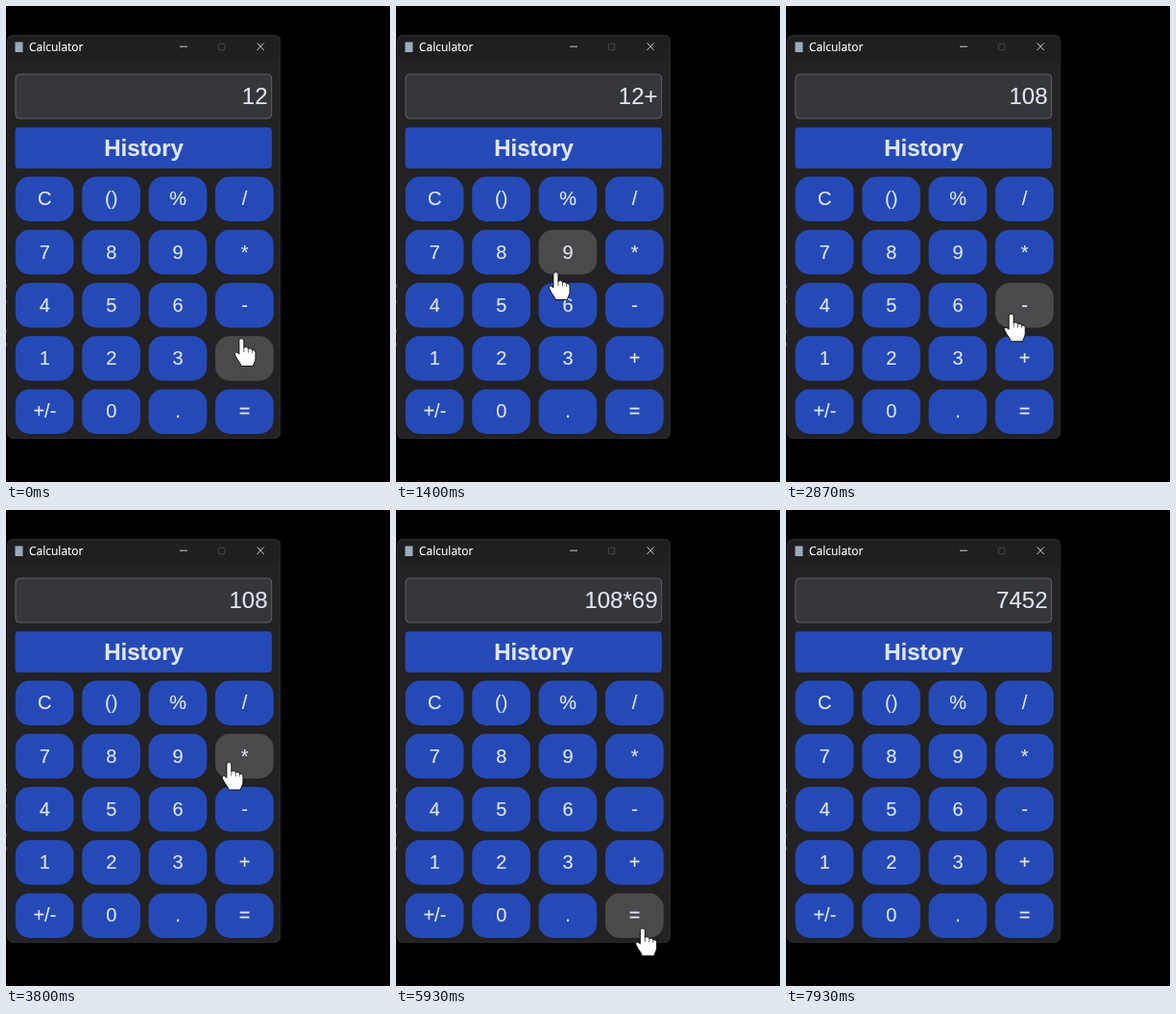
An HTML page that plays this animation: 400 px wide and 495 px high, repeating every 8000 ms.

```html
<!DOCTYPE html>
<html lang="en">
<head>
<meta charset="utf-8">
<title>Calculator</title>
<style>
  html, body { margin: 0; width: 100%; height: 100%; overflow: hidden; background: #000; }
  svg { display: block; width: 400px; height: 495px; }
  text { fill: #dfe5f2; stroke: #dfe5f2; stroke-width: .15; font-family: "Liberation Sans", Arial, sans-serif; }
  .key rect, .history { fill: #254ab8; }
  .key.hover rect { fill: #4b494c; }
  .key text { font-size: 20px; text-anchor: middle; }
  .title { font: 12px "Open Sans", "Noto Sans", sans-serif; fill: #fff; stroke: #fff; }
  .controls { fill: none; stroke: #dcdcdc; stroke-width: .9; }
  .hand { fill: #fff; stroke: #111; stroke-linejoin: round; }
</style>
</head>
<body>
<svg viewBox="0 0 400 495">
  <path d="M.5 289v4M.5 306v3M.5 337v3M.5 350v4" stroke="#3a3a3a"/>
  <rect x="1" y="30" width="285" height="420" rx="6" fill="#222124"/>
  <path d="M1 55V36a6 6 0 0 1 6-6H280a6 6 0 0 1 6 6V55Z" fill="#1f1e20"/>
  <rect x="1.5" y="30.5" width="284" height="419" rx="6" fill="none" stroke="#2a292c"/>
  <rect x="9.5" y="37.5" width="8" height="10.5" fill="#9aabba"/>
  <text class="title" x="24" y="47">Calculator</text>
  <g class="controls">
    <path d="M181 42.2h8M261.5 38.5l7.3 7.5M268.8 38.5l-7.3 7.5"/>
    <rect x="221.3" y="39.3" width="6.5" height="6.5" rx="1" stroke="#504f51"/>
  </g>
  <rect x="10" y="71" width="266.7" height="46" rx="4" fill="#343639" stroke="#5f6163"/>
  <text id="display" x="272.5" y="101.7" font-size="24" text-anchor="end">12</text>
  <rect class="history" x="9.5" y="126.2" width="267.4" height="42.8" rx="4"/>
  <text x="143.5" y="155.8" font-size="24" font-weight="bold" text-anchor="middle">History</text>
  <g id="keys"></g>
  <g id="cursor" class="hand">
    <path d="M-2.5 3C-2.5-.6 2.5-.6 2.5 3V10C4 8.4 6.8 9 7 11C8.6 9.8 10.8 10.6 11 12.4C13 11.6 14.6 12.8 14.6 15V21C14.6 24 12.5 25.5 12 29H-.5C-1 25.5-4 23.5-6.3 18.5C-8.5 15-5.5 12.8-2.5 16.5Z"/>
    <path d="M2.5 10v4.5M7 11v4M11 12.4v3" stroke-width=".8" opacity=".8"/>
  </g>
</svg>
<script>
  const LOOP = 8000, FPS = 15;
  const KEY_W = 60.7, KEY_H = 46.5;
  const PAUSE = 100;
  const LABELS = "C () % / 7 8 9 * 4 5 6 - 1 2 3 + +/- 0 . =".split(" ");

  const byId = id => document.getElementById(id);
  const display = byId("display"), cursor = byId("cursor");

  function make(tag, attrs, parent) {
    const el = document.createElementNS("http://www.w3.org/2000/svg", tag);
    for (const name in attrs) el.setAttribute(name, attrs[name]);
    return parent.appendChild(el);
  }

  const keys = LABELS.map((label, i) => {
    const x = 9.8 + (i % 4) * 69.4, y = 177.5 + Math.floor(i / 4) * 55.25;
    const el = make("g", { class: "key" }, byId("keys"));
    make("rect", { x, y, width: KEY_W, height: KEY_H, rx: 15 }, el);
    make("text", { x: x + KEY_W / 2 + .2, y: y + 29.8 }, el).textContent = label;
    return { el, x, y };
  });

  const historyCenter = { x: 143.3, y: 147.7 };

  // A click at time `at`, offset from the middle of its button
  function click(label, at, dx, dy) {
    const key = keys[LABELS.indexOf(label)];
    const center = key ? { x: key.x + KEY_W / 2, y: key.y + KEY_H / 2 } : historyCenter;
    return { label, at, x: center.x + dx, y: center.y + dy };
  }

  const clicks = [
    click("+", 460, -3, -21),
    click("9", 1600, -12.5, 20.5),
    click("6", 2020, 0, -3),
    click("=", 2545, -10, -6),
    click("*", 4540, -16, 6),
    click("6", 4980, 0, -3),
    click("9", 5400, 0, 6),
    click("=", 6250, 8.5, 13),
    click("History", 7350, 42, 10)
  ];

  // The pointer leaves shortly after a click; longer ways take longer.
  function cursorAt(t) {
    const left = clicks.findLastIndex(c => c.at + PAUSE <= t);
    if (left < 0) return clicks[0];
    const from = clicks[left], to = clicks[left + 1];
    if (!to) return null;
    const dx = to.x - from.x, dy = to.y - from.y;
    const duration = 180 + 1.3 * Math.hypot(dx, dy);
    const u = Math.min((t - from.at - PAUSE) / duration, 1);
    const eased = u * u * (3 - 2 * u);
    return { x: from.x + dx * eased, y: from.y + dy * eased };
  }

  function evaluate(expression) {
    const [a, b] = expression.split(/[+*]/).map(Number);
    return String(expression.includes("+") ? a + b : a * b);
  }

  const press = (shown, { label }) =>
    label === "History" ? shown : label === "=" ? evaluate(shown) : shown + label;

  const inside = (v, start, size) => v >= start - 1.5 && v <= start + size + 1.5;

  function draw(now) {
    const t = Math.floor((now % LOOP + 4) * FPS / 1000) * 1000 / FPS % LOOP;
    const tip = cursorAt(t);
    cursor.setAttribute("visibility", tip ? "visible" : "hidden");
    if (tip) cursor.setAttribute("transform", `translate(${tip.x} ${tip.y})`);
    for (const key of keys) {
      const over = tip && inside(tip.x, key.x, KEY_W) && inside(tip.y, key.y, KEY_H);
      key.el.classList.toggle("hover", !!over);
    }
    display.textContent = clicks.filter(c => c.at <= t).reduce(press, "12");
  }

  let start;
  function tick(now) {
    start ??= now;
    draw(now - start);
    requestAnimationFrame(tick);
  }
  draw(0);
  requestAnimationFrame(tick);
</script>
</body>
</html>
```
